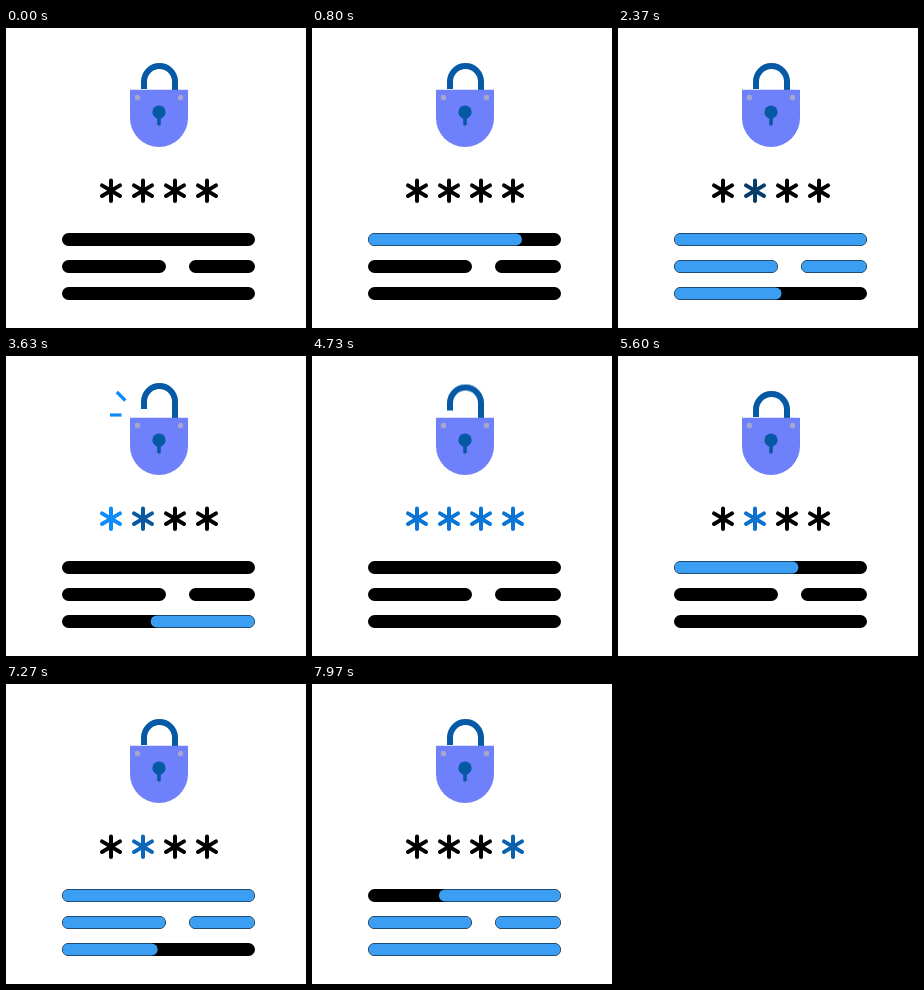
These frames come from a looping animation (300 px wide and 300 px high, 8 s). An HTML page without scripts:

```html
<!DOCTYPE html>
<html lang="en">
<head>
<meta charset="utf-8">
<title>Password unlock</title>
<style>
  /* --u: ms within a cycle, --s: where the blue part of the bars begins */
  @property --u { syntax: "<number>"; inherits: true; initial-value: 0; }
  @property --s { syntax: "<number>"; inherits: true; initial-value: -0.2; }

  html, body { margin: 0; width: 100%; height: 100%; overflow: hidden; background: #fff; }
  svg {
    display: block; width: 100%; height: 100%; fill: none;
    animation: cycle 8s linear infinite, drain 8s linear infinite;
  }

  @keyframes cycle {
    0% { --u: 0; }
    62.087% { --u: 4967; }
    62.088% { --u: 0; }
    100% { --u: 3033; }
  }
  @keyframes drain {
    0% { --s: -0.2; }
    36% { --s: -0.2; animation-timing-function: cubic-bezier(.15, .15, .42, 1); }
    52.69% { --s: 504.2; }
    62.087% { --s: 504.2; }
    62.088%, 98.09% { --s: -0.2; }
    100% { --s: 87; }
  }

  .bars { stroke: #000; stroke-width: 13; stroke-linecap: round; }
  .fill {
    --e: min(var(--u) * .1768 - .2, 504.2);
    stroke: #3b9ef2; stroke-width: 12;
  }
  /* --at: length of all bars before this one */
  .fill path {
    stroke-dasharray: calc((var(--e) - var(--s)) * 1px) 3000px;
    stroke-dashoffset: calc((var(--at) - var(--s)) * 1px);
  }

  .stars { stroke-width: 4; stroke-linecap: round; }
  .stars use {
    --p: (var(--u) - 405 * var(--k));
    --q: (var(--p) - 1655);
    --first: min(var(--p) / 190, (400 - var(--p)) / 210);
    --second: min(var(--q) / 190, (400 - var(--q)) / 210);
    --open: min(1, (var(--u) - 3310 - 200 * var(--k)) / 190, (4900 - var(--u)) / 200);
    --b: max(0, var(--first), var(--second), var(--open));
    stroke: rgb(calc(13 * var(--b)) calc(139 * var(--b)) calc(250 * var(--b)));
  }

  .shackle { stroke: #0559a5; stroke-width: 6; animation: lift 8s infinite; }
  @keyframes lift {
    0%, 41.3% { transform: translateY(0); animation-timing-function: ease-in-out; }
    44.4%, 57.5% { transform: translateY(-8px); animation-timing-function: ease-in-out; }
    63%, 100% { transform: translateY(0); }
  }

  .sparks {
    stroke: #0d8bfa; stroke-width: 3.2;
    stroke-dasharray: 1 3; animation: spark 8s infinite;
  }
  @keyframes spark {
    0%, 42% { stroke-dashoffset: 1; }
    45%, 53% { stroke-dashoffset: 0; }
    56%, 100% { stroke-dashoffset: -1; }
  }
</style>
</head>
<body>
<svg viewBox="0 0 300 300">
  <defs>
    <path id="star" d="M0-10.2V10.2M-9-5.3L9 5.3M9-5.3L-9 5.3"/>
  </defs>

  <g class="sparks">
    <path pathLength="1" d="M119.3 44.5L110.8 36"/>
    <path pathLength="1" d="M115.5 59H104"/>
  </g>

  <path class="shackle" d="M138 61V53.5a15.5 15.5 0 0 1 31 0V72"/>
  <path fill="#6f80fb" d="M124 61.7H182V90a29 29 0 0 1-58 0Z"/>
  <g fill="#a5a8c8">
    <circle cx="131.5" cy="69.5" r="2.7"/>
    <circle cx="174.5" cy="69.5" r="2.7"/>
  </g>
  <circle cx="153" cy="84" r="6.6" fill="#0559a5"/>
  <path d="M153 84V96" stroke="#0559a5" stroke-width="3.6" stroke-linecap="round"/>

  <g class="stars">
    <use href="#star" x="105" y="162.7" style="--k:0"/>
    <use href="#star" x="137" y="162.7" style="--k:1"/>
    <use href="#star" x="169" y="162.7" style="--k:2"/>
    <use href="#star" x="201" y="162.7" style="--k:3"/>
  </g>

  <g class="bars">
    <path d="M62.5 211.5h180M62.5 238.5h91M189.5 238.5h53M62.5 265.5h180"/>
    <g class="fill">
      <path style="--at:0" d="M62.5 211.5h180"/>
      <path style="--at:180" d="M62.5 238.5h91"/>
      <path style="--at:271" d="M189.5 238.5h53"/>
      <path style="--at:324" d="M62.5 265.5h180"/>
    </g>
  </g>
</svg>
</body>
</html>
```
